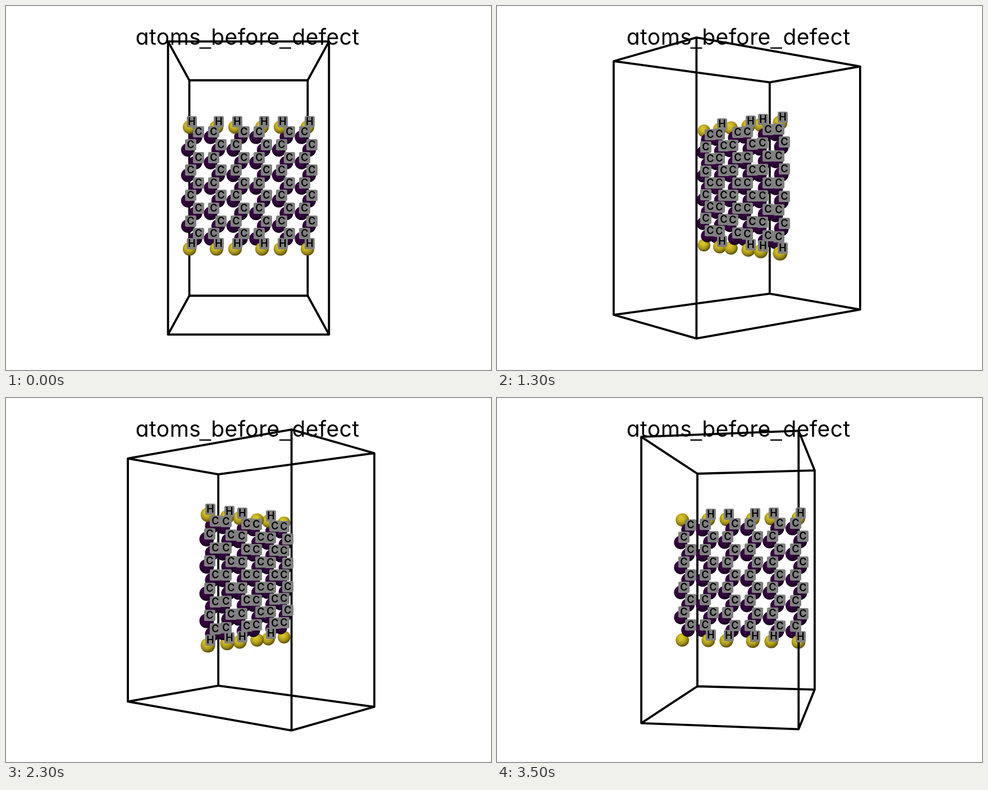
Recreate the animation shown at these times as an HTML page with a canvas. Size 864 by 648 pixels, loop 3600 ms.

```html
<!DOCTYPE html>
<html lang="en">
<head>
<meta charset="utf-8">
<title>Rotating lattice</title>
<style>
  html, body { margin: 0; width: 100%; height: 100%; overflow: hidden; background: #fff; }
  canvas, svg { position: absolute; left: 0; top: 0; display: block; }
  text {
    font: 400 39px Inter, "Open Sans", sans-serif;
    font-feature-settings: "cv11";
    letter-spacing: 0.4px;
    text-anchor: middle;
  }
  .bar { font: 36px "Liberation Sans", sans-serif; letter-spacing: 0; }
</style>
</head>
<body>
<canvas id="stage" width="864" height="648"></canvas>
<svg width="864" height="648" viewBox="0 0 864 648">
  <text x="289" y="69">atoms</text>
  <text class="bar" x="355" y="69">_</text>
  <text x="426.5" y="69">before</text>
  <text class="bar" x="497.5" y="69">_</text>
  <text x="569.5" y="69">defect</text>
</svg>
<script>
const ctx = document.getElementById("stage").getContext("2d");
const CX = 432, CY = 324, CAMERA = 1209;
const BOX = { x: 121.5, y: 221, z: 184.5 };
const BOND = 27, ROW = 22.6, RADIUS = 12.1;
const STEP_MS = 100, STEPS = 36;
const LABEL = { C: { width: 20, reach: 8.3 }, H: { width: 18, reach: 9.5 } };
const LABEL_HEIGHT = 20, CLEAR_X = 12.8;

const atoms = [];

function addRow(kind, y, start) {
  for (const cell of [0, 1, -1]) atoms.push({ kind, x: start + cell * 3 * BOND, y });
}

// Carbon: the two halves of each row, one sublattice after the other.
for (const half of [0, 1]) {
  for (let row = -4; row <= 4; row++) {
    const start = row % 2 ? [-BOND, BOND][half] : [-BOND / 2, BOND / 2][half];
    addRow("C", row * ROW, start);
  }
}
// Hydrogen caps along both edges.
for (const y of [-108.5, 108.5]) {
  addRow("H", y, 24);
  addRow("H", y, -24);
}

function shade(stops) {
  const g = ctx.createRadialGradient(-2.5, -4.5, 0, -1.5, -2.5, RADIUS * 1.25);
  stops.forEach((color, i) => g.addColorStop(i / (stops.length - 1), color));
  return g;
}

const fills = {
  C: shade(["#3e064a", "#380444", "#2b0335", "#14011b"]),
  H: shade(["#dcc625", "#ceb820", "#a39118", "#50470b"])
};

function project(x, y, z, angle) {
  const c = Math.cos(angle), s = Math.sin(angle);
  const depth = z * c - x * s;
  const scale = CAMERA / (CAMERA - depth);
  return { x: CX + (x * c + z * s) * scale, y: CY + y * scale, scale };
}

function drawFace(side, angle) {
  const at = (sx, sy, sz) => project(sx * BOX.x, sy * BOX.y, sz * BOX.z, angle);
  const corners = [at(-1, -1, side), at(1, -1, side), at(1, 1, side), at(-1, 1, side)];
  ctx.beginPath();
  corners.forEach(p => ctx.lineTo(p.x, p.y));
  ctx.closePath();
  for (const sx of [-1, 1]) {
    for (const sy of [-1, 1]) {
      const outer = at(sx, sy, side), middle = at(sx, sy, 0);
      ctx.moveTo(outer.x, outer.y);
      ctx.lineTo(middle.x, middle.y);
    }
  }
  ctx.stroke();
}

function drawAtom({ kind, x, y, scale }) {
  ctx.save();
  ctx.translate(x, y);
  ctx.scale(scale, scale);
  ctx.fillStyle = fills[kind];
  ctx.beginPath();
  ctx.arc(0, 0, RADIUS, 0, Math.PI * 2);
  ctx.fill();
  ctx.restore();
}

function drawLabel({ kind, x, y }) {
  const { width } = LABEL[kind];
  const left = Math.round(x - 4.7), top = Math.round(y - 19.3);
  ctx.fillStyle = "#808080";
  ctx.beginPath();
  ctx.roundRect(left, top, width, LABEL_HEIGHT, 2.5);
  ctx.fill();
  ctx.fillStyle = "#000";
  ctx.fillText(kind, left + width / 2, top + 16);
}

// A label is dropped when it would cover one already placed.
function placeLabels(points) {
  const placed = [];
  for (const p of points) {
    const blocked = placed.some(q =>
      Math.abs(p.x - q.x) < CLEAR_X &&
      Math.abs(p.y - q.y) < LABEL[p.kind].reach + LABEL[q.kind].reach);
    if (!blocked) placed.push(p);
  }
  return placed;
}

function draw(step) {
  const angle = step / STEPS * Math.PI * 2;
  const front = Math.cos(angle) >= 0 ? 1 : -1;
  const points = atoms.map(a => ({ kind: a.kind, ...project(a.x, a.y, 0, angle) }));

  ctx.fillStyle = "#fff";
  ctx.fillRect(0, 0, 864, 648);
  ctx.strokeStyle = "#000";
  ctx.lineWidth = 3.8;
  ctx.lineJoin = "round";
  ctx.font = "600 18px Inter, 'Open Sans', sans-serif";
  ctx.textAlign = "center";

  drawFace(-front, angle);
  [...points].sort((a, b) => a.scale - b.scale).forEach(drawAtom);
  drawFace(front, angle);
  placeLabels(points).forEach(drawLabel);
}

const begin = performance.now();
let shown = -1;

function tick() {
  const step = Math.floor((performance.now() - begin) / STEP_MS) % STEPS;
  if (step !== shown) draw(shown = step);
  requestAnimationFrame(tick);
}
tick();
</script>
</body>
</html>
```
